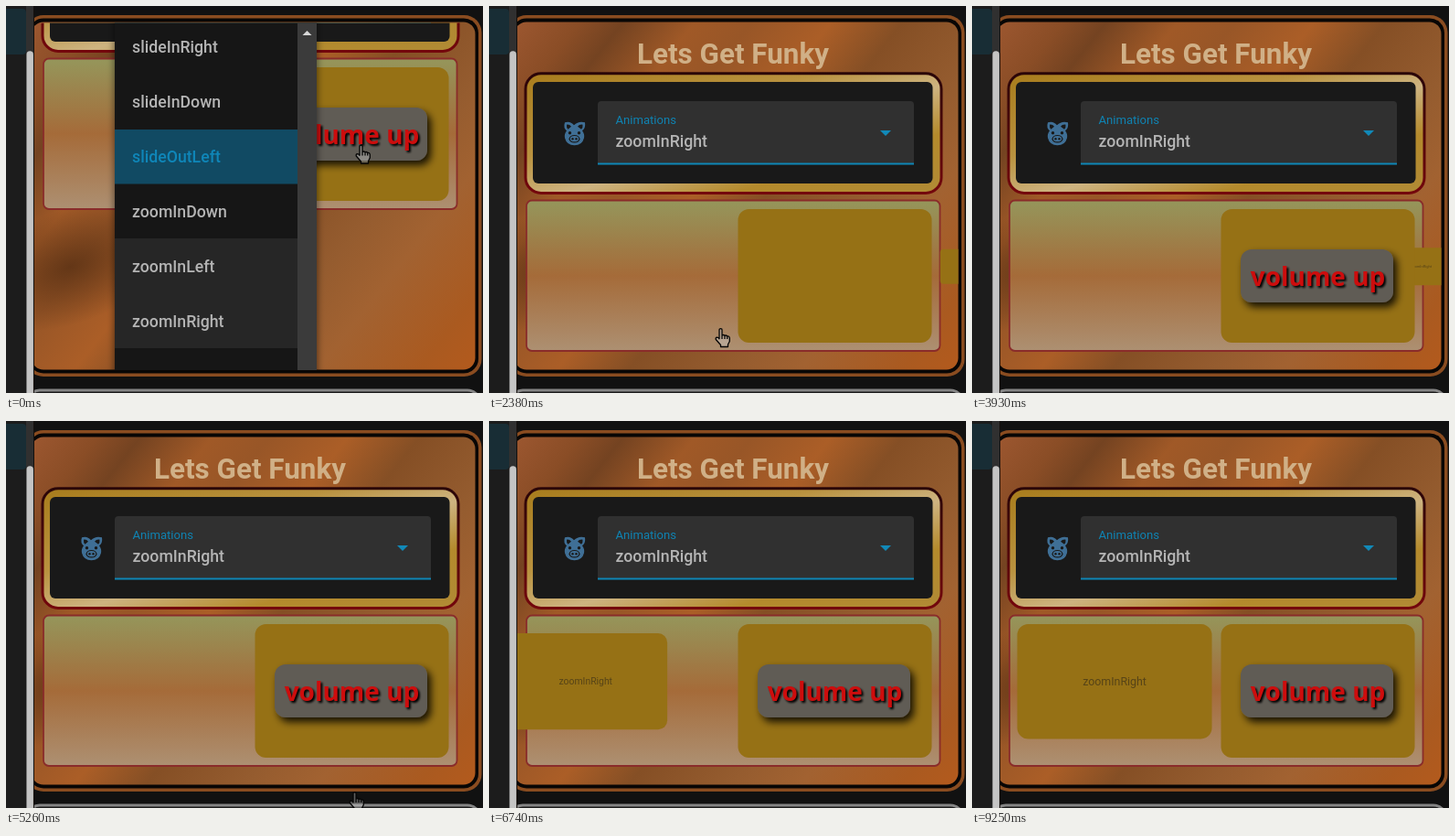
These frames come from a looping animation (522x423 px, 9820 ms). An HTML page:

```html
<!DOCTYPE html>
<html lang="en">
<head>
<meta charset="utf-8">
<title>Lets Get Funky</title>
<style>
  html, body { margin: 0; width: 100%; height: 100%; overflow: hidden; background: #111; }
  svg { display: block; width: 522px; height: 423px; }
  text { font-family: Roboto, sans-serif; }
  .item { font-size: 17.7px; font-weight: 500; fill: #b4b4b4; }
  .shout { font: 700 28px "Noto Sans", "Open Sans", sans-serif; text-anchor: middle; }
</style>
</head>
<body>
<svg viewBox="0 0 522 423" xmlns="http://www.w3.org/2000/svg">
  <defs>
    <linearGradient id="copper" gradientUnits="userSpaceOnUse" x1="30" y1="17" x2="513" y2="398">
      <stop offset="0" stop-color="#9c5730"/>
      <stop offset=".09" stop-color="#8a4d26"/>
      <stop offset=".15" stop-color="#744321"/>
      <stop offset=".25" stop-color="#a05927"/>
      <stop offset=".33" stop-color="#985627"/>
      <stop offset=".44" stop-color="#ab5e27"/>
      <stop offset=".54" stop-color="#854f25"/>
      <stop offset=".68" stop-color="#955c2f"/>
      <stop offset=".78" stop-color="#a26231"/>
      <stop offset=".92" stop-color="#aa5a20"/>
      <stop offset="1" stop-color="#b35a1d"/>
    </linearGradient>
    <radialGradient id="shade">
      <stop offset="0" stop-color="#5a3114" stop-opacity=".85"/>
      <stop offset="1" stop-color="#5a3114" stop-opacity="0"/>
    </radialGradient>
    <linearGradient id="gold" x1="0" y1="0" x2="1" y2="1">
      <stop offset="0" stop-color="#a87c1c"/>
      <stop offset=".35" stop-color="#b9923f"/>
      <stop offset=".55" stop-color="#cdb380"/>
      <stop offset=".75" stop-color="#b48a2c"/>
      <stop offset="1" stop-color="#b08a35"/>
    </linearGradient>
    <linearGradient id="rim" x1="0" y1="0" x2="0" y2="1">
      <stop offset="0" stop-color="#2a0508"/>
      <stop offset="1" stop-color="#74070c"/>
    </linearGradient>
    <linearGradient id="sand" x1="0" y1="0" x2="0" y2="1">
      <stop offset="0" stop-color="#95965b"/>
      <stop offset=".5" stop-color="#a56b39"/>
      <stop offset="1" stop-color="#ad9072"/>
    </linearGradient>
    <filter id="soft" x="-20%" y="-40%" width="140%" height="200%">
      <feDropShadow dx="4" dy="5" stdDeviation="4" flood-color="#000" flood-opacity=".85"/>
    </filter>
    <filter id="lift" x="-20%" y="-20%" width="140%" height="140%">
      <feDropShadow dx="0" dy="3" stdDeviation="4" flood-color="#000" flood-opacity=".6"/>
    </filter>
    <filter id="haze"><feGaussianBlur stdDeviation="1.1"/></filter>
    <clipPath id="card"><rect x="30" y="18.5" width="483.5" height="379.5" rx="12"/></clipPath>
    <clipPath id="side"><rect x="30" y="0" width="492" height="423"/></clipPath>
    <clipPath id="slot"><rect x="272.5" y="222" width="212" height="146" rx="12"/></clipPath>
  </defs>

  <rect width="522" height="423" fill="#111"/>

  <g clip-path="url(#side)">
    <rect x="22" y="10" width="498.500" height="395" rx="19" fill="#8a4c20"/>
    <rect x="25" y="13.500" width="492" height="388" rx="16" fill="#080605"/>
    <rect x="28" y="17.500" width="485.500" height="380" rx="13" fill="url(#copper)"/>
    <ellipse cx="70" cy="285" rx="115" ry="62" fill="url(#shade)" transform="rotate(-20 70 285)"/>
    <rect x="23" y="420" width="496" height="40" rx="14" fill="#1b1b1b" stroke="#858585" stroke-width="3"/>
  </g>

  <g clip-path="url(#card)">
    <g id="page">
      <text x="267" y="62.500" font-size="31.400" font-weight="700" text-anchor="middle" fill="#d0b087">Lets Get Funky</text>

      <rect x="40" y="73.800" width="455" height="130.600" rx="17" fill="url(#gold)" stroke="url(#rim)" stroke-width="3"/>
      <rect x="48" y="83" width="437.500" height="111" rx="6" fill="#191919"/>

      <g fill="#3f6f96" transform="translate(0 -.8)">
        <path d="M83 128Q89 126 93 131Q98 126 105 128Q106 134 102 137Q105 141 104 145Q102 153 93.500 153Q85 153 83 145Q82 141 85 137Q81 134 83 128Z"/>
        <g fill="#191919">
          <path d="M85 130.500Q88 130 90 132.500L86.500 135.500Q84.500 133.500 85 130.500ZM102.500 130.500Q99 130 97 132.500L101 135.500Q103 133.500 102.500 130.500Z"/>
          <circle cx="88.500" cy="139.500" r="1.700"/>
          <circle cx="98.500" cy="139.500" r="1.700"/>
          <ellipse cx="93.500" cy="146" rx="6" ry="4.300"/>
        </g>
        <ellipse cx="93.500" cy="146" rx="4.700" ry="3.100"/>
        <circle cx="91.500" cy="146" r="1.200" fill="#191919"/>
        <circle cx="95.500" cy="146" r="1.200" fill="#191919"/>
      </g>

      <path id="field" d="M119 173V108a4 4 0 0 1 4-4H461a4 4 0 0 1 4 4V173Z"/>
      <rect x="119" y="171.500" width="346" height="2" fill="#0e86b6"/>
      <text x="138.500" y="129" font-size="13.100" fill="#0f83b2">Animations</text>
      <text x="138.500" y="153.500" class="item">zoomInRight</text>
      <path id="arrow" d="M-6 -3H6L0 3Z" fill="#1189b8"/>

      <rect x="41" y="212.500" width="452.500" height="164.500" rx="6" fill="url(#sand)" stroke="#8a2c2a" stroke-width="1.800"/>
      <g id="label">
        <rect x="-106.500" y="-62.700" width="213" height="125.400" rx="12" fill="#967115"/>
        <text y="4.500" font-size="12.400" text-anchor="middle" fill="#574417">zoomInRight</text>
      </g>
      <rect x="272.500" y="222" width="212" height="146" rx="12" fill="#967115"/>
      <g clip-path="url(#slot)">
        <g id="button">
          <rect x="-83.500" y="-29" width="167" height="58" rx="12" fill="#605b55" filter="url(#soft)"/>
          <text class="shout" x="3" y="13" fill="#000" filter="url(#haze)">volume up</text>
          <text class="shout" x="1" y="11" fill="#cd0d0d">volume up</text>
        </g>
      </g>
    </g>

    <g id="menu">
      <rect x="119" y="0" width="221" height="430" fill="#191919" filter="url(#lift)"/>
      <rect x="119" y="254" width="200" height="120" fill="#262626"/>
      <rect x="119" y="135" width="200" height="59.500" fill="#114a63"/>
      <rect x="319" y="0" width="21" height="430" fill="#3b3b3b"/>
      <path d="M324.500 32L329.500 27L334.500 32Z" fill="#d8d8d8"/>
    </g>
  </g>

  <rect width="22" height="423" fill="#1c1c1c"/>
  <path d="M0 3H18a4 4 0 0 1 4 4V49a4 4 0 0 1-4 4H0Z" fill="#182d35"/>
  <rect x="22" width="8" height="423" fill="#303030"/>
  <path d="M22.500 423V53a3.700 3.700 0 0 1 7.400 0V423Z" fill="#c4c4c4"/>
  <rect x="30" width="1" height="423" fill="#15100d"/>

  <path id="hand" d="M5 11V2Q5 .7 6.500 .7T8 2V8Q9.500 6.800 11 8.300Q12.500 7.500 13.700 9Q16 8.500 16.300 11V14.500L14.500 18V20.500H6.500V18.500L1.300 12.500Q.700 10.500 2.500 10.200Q4 10.200 5 11.800ZM8 8V12M11 8.300V12M13.700 9V12"
        fill="#c8c8c8" fill-opacity=".42" stroke="#050505" stroke-width="1.300" stroke-linejoin="round"/>
</svg>

<script>
  const LOOP = 9820;
  const $ = id => document.getElementById(id);
  const clamp = v => Math.min(1, Math.max(0, v));
  const mix = (a, b, p) => a + (b - a) * p;
  const move = (el, x, y, more = "") => el.setAttribute("transform", `translate(${x} ${y}) ${more}`);
  const show = (el, on) => el.setAttribute("visibility", on ? "visible" : "hidden");

  ["slideInRight", "slideInDown", "slideOutLeft", "zoomInDown", "zoomInLeft", "zoomInRight"].forEach((name, i) => {
    const row = document.createElementNS("http://www.w3.org/2000/svg", "text");
    row.textContent = name;
    row.setAttribute("class", "item");
    row.setAttribute("x", 138);
    row.setAttribute("y", 50.5 + 60 * i);
    if (i === 2) row.style.fill = "#0f86b8";
    $("menu").append(row);
  });

  function bezier(x1, y1, x2, y2) {
    const at = (a, b, u) => 3 * (1 - u) * (1 - u) * u * a + 3 * (1 - u) * u * u * b + u * u * u;
    return x => {
      let lo = 0, hi = 1;
      for (let i = 0; i < 24; i++) {
        const mid = (lo + hi) / 2;
        if (at(x1, x2, mid) < x) lo = mid; else hi = mid;
      }
      return at(y1, y2, lo);
    };
  }
  const easeIn = bezier(0.55, 0.055, 0.675, 0.19);
  const easeOut = bezier(0.175, 0.885, 0.32, 1);

  // Flies in from the right, overshoots to the left, then grows into place.
  function zoomInRight(el, x, y, f) {
    let scale, shift;
    if (f < 0.6) {
      const p = easeIn(clamp(f / 0.6));
      scale = mix(0.3, 0.475, p);
      shift = mix(1250, -195, p);
    } else {
      const p = f >= 1 ? 1 : easeOut((f - 0.6) / 0.4);
      scale = mix(0.475, 1, p);
      shift = mix(-195, 0, p);
    }
    move(el, x + scale * shift, y, `scale(${scale})`);
  }

  function moveHand(t) {
    const glide = clamp((t - 70) / 560);
    const p = glide * glide * (3 - 2 * glide);
    const drift = clamp((t - 5260) / 220);
    if (t < 5000) move($("hand"), mix(382, 247, p), mix(151.5, 352, p));
    else move($("hand"), mix(375, 380, drift), mix(405, 412, drift));
    show($("hand"), t < 2700 || (t >= 5260 && t < 5480));
  }

  function draw(t) {
    const open = t < 790;
    const started = t >= 1640;
    const closing = clamp((t - 860) / 230);
    const grey = Math.round(mix(34, 48, closing));

    show($("menu"), open);
    move($("page"), 0, open ? -155 : 0);
    $("field").setAttribute("fill", `rgb(${grey},${grey},${grey})`);
    move($("arrow"), 434, 139, `rotate(${180 * (1 - closing)})`);

    show($("label"), started);
    zoomInRight($("label"), 156, 284.7, (t - 1620) / 7500);
    zoomInRight($("button"), 377.5, 295, started ? (t - 1620) / 2315 : 1);
    moveHand(t);
  }

  const start = performance.now();
  function tick() {
    draw((performance.now() - start) % LOOP);
    requestAnimationFrame(tick);
  }
  tick();
</script>
</body>
</html>
```
